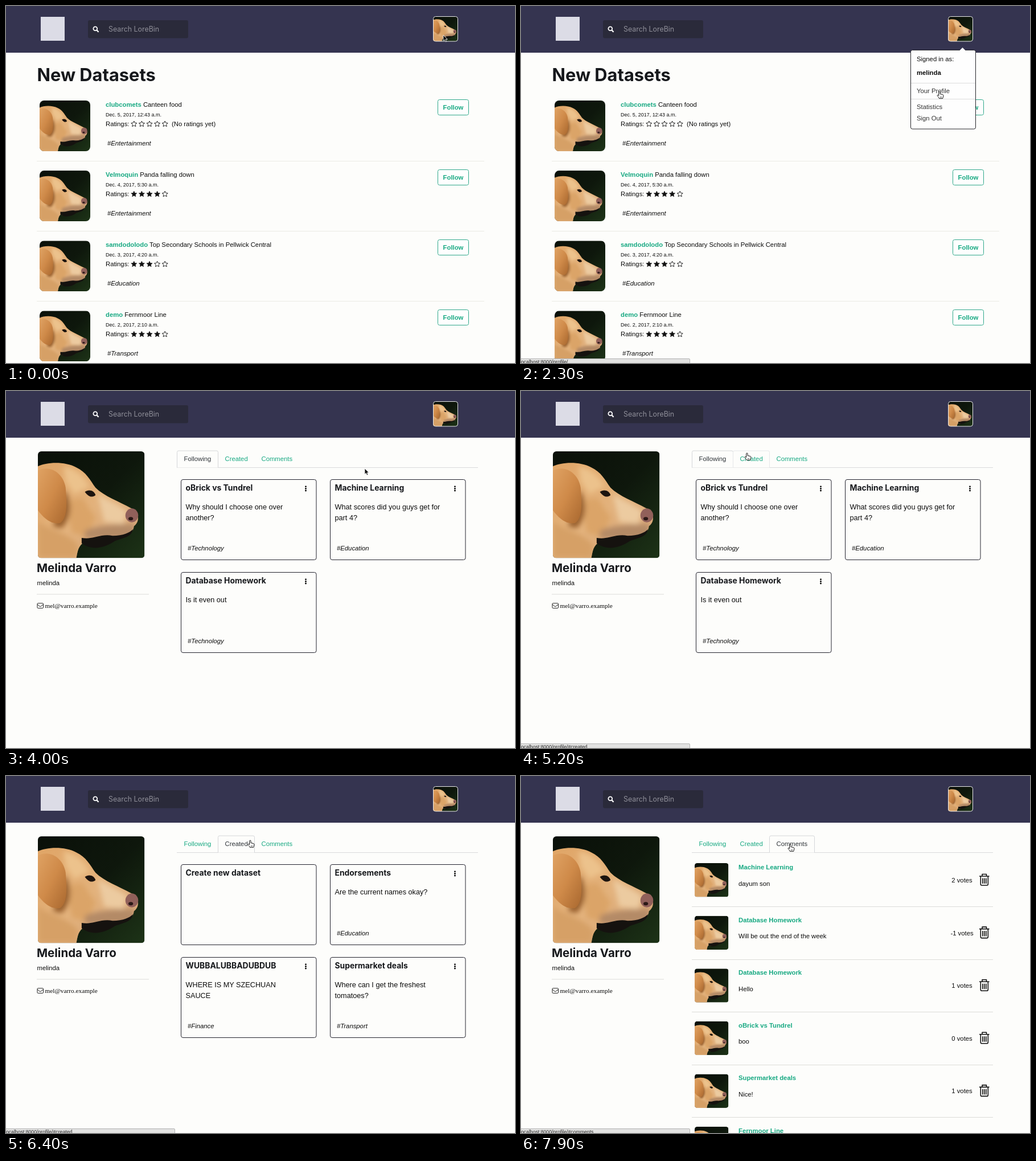
An HTML page for the animation above (8 s loop, 894 by 627 pixels).

```html
<!DOCTYPE html>
<html lang="en">
<head>
<meta charset="utf-8">
<title>Dataset site tour</title>
<style>
html, body { margin: 0; width: 100%; height: 100%; overflow: hidden; background: #fdfdfb; }
svg { display: block; width: 894px; height: 627px; }
text { font: 11.3px "Liberation Sans", Arial, sans-serif; fill: #0c0c0c; white-space: pre; }
.b { font-weight: 700; }
.i { font-style: italic; }
.bold-link { fill: #17a982; font-weight: 700; }
.small { font-size: 8.95px; }
.body { font-size: 12.7px; }
.menu { fill: #333; }
.mid { text-anchor: middle; }
.head { font: 700 13.9px Inter, sans-serif; fill: #16181c; }
.title { font: 700 30.8px Inter, sans-serif; fill: #16181c; }
.name { font: 700 20.5px Inter, sans-serif; fill: #16181c; }
.search { font: 12.4px Inter, sans-serif; fill: #8f8f99; }
.serif { font-family: "Liberation Serif", Times, serif; }
.status { font-size: 8.7px; fill: #222; }
</style>
</head>
<body>
<svg id="stage" viewBox="0 0 894 627" xmlns="http://www.w3.org/2000/svg"></svg>
<script>
const LOOP = 8000, STEP = 100;
const MENU_OPEN = 400, MENU_CLICK = 2700, PAGE_LOAD = 3400, TAB_CLICKS = [5800, 7500];

// time, x, y of the pointer tip
const PATH = [
  [0, 768, 51], [900, 768, 51], [1600, 745, 108], [2200, 735, 150], [3300, 735, 150],
  [4000, 630, 136], [5000, 399, 109], [5200, 397, 109], [5700, 405, 114],
  [6100, 405, 114], [6400, 429, 113], [7000, 473, 120], [8000, 473, 120]
];

const TABS = [['Following', 301, 373], ['Created', 373, 437], ['Comments', 437, 516]];

const DATASETS = [
  ['clubcomets', 'Canteen food', 'Dec. 5, 2017, 12:43 a.m.', 0, 'Entertainment'],
  ['Velmoquin', 'Panda falling down', 'Dec. 4, 2017, 5:30 a.m.', 4, 'Entertainment'],
  ['samdodolodo', 'Top Secondary Schools in Pellwick Central', 'Dec. 3, 2017, 4:20 a.m.', 3, 'Education'],
  ['demo', 'Fernmoor Line', 'Dec. 2, 2017, 2:10 a.m.', 4, 'Transport']
];
const FOLLOWING = [
  ['oBrick vs Tundrel', ['Why should I choose one over', 'another?'], 'Technology'],
  ['Machine Learning', ['What scores did you guys get for', 'part 4?'], 'Education'],
  ['Database Homework', ['Is it even out'], 'Technology']
];
const CREATED = [
  ['Create new dataset', [], ''],
  ['Endorsements', ['Are the current names okay?'], 'Education'],
  ['WUBBALUBBADUBDUB', ['WHERE IS MY SZECHUAN', 'SAUCE'], 'Finance'],
  ['Supermarket deals', ['Where can I get the freshest', 'tomatoes?'], 'Transport']
];
const COMMENTS = [
  ['Machine Learning', 'dayum son', 2],
  ['Database Homework', 'Will be out the end of the week', -1],
  ['Database Homework', 'Hello', 1],
  ['oBrick vs Tundrel', 'boo', 0],
  ['Supermarket deals', 'Nice!', 1],
  ['Fernmoor Line', '', 0]
];

const text = (x, y, s, cls = '') => `<text x="${x}" y="${y}" class="${cls}">${s}</text>`;
const rect = (x, y, w, h, r, fill, stroke = 'none') =>
  `<rect x="${x}" y="${y}" width="${w}" height="${h}" rx="${r}" fill="${fill}" stroke="${stroke}"/>`;
const rule = (x1, x2, y, color) => `<path d="M${x1} ${y}H${x2}" stroke="${color}"/>`;
const path = (d, fill, stroke = 'none', w = 1) =>
  `<path d="${d}" fill="${fill}" stroke="${stroke}" stroke-width="${w}" stroke-linejoin="round"/>`;
const group = (id, body) => `<g id="${id}">${body}</g>`;

let clips = 0;
function photo(x, y, size, r) {
  const id = 'clip' + clips++;
  return `<clipPath id="${id}">${rect(x, y, size, size, r, '#000')}</clipPath>` +
    `<g clip-path="url(#${id})"><use href="#dog" x="${x}" y="${y}" width="${size}" height="${size}"/></g>`;
}

const gradient = (id, ...colors) => `<linearGradient id="${id}" x1="0" y1="0" x2="1" y2="1">` +
  colors.map((c, k) => `<stop offset="${k / (colors.length - 1)}" stop-color="${c}"/>`).join('') + '</linearGradient>';

const HEAD = 'M0 14C8 10 25 9 36 15C45 19 49 27 54 34C62 42 76 47 87 53C95 56 96 66 90 70C89 80 78 79 68 80L58 87C50 90 45 89 42 86C37 90 37 96 36 100H0Z';
const dog = `<symbol id="dog" viewBox="0 0 100 100">
  ${gradient('dark', '#0a1009', '#0e170c', '#1d3317')}
  ${gradient('fur', '#e0a566', '#e3b27c', '#d3a378')}
  ${gradient('ear', '#dfa263', '#cf8a49', '#a9682f')}
  <filter id="soft"><feGaussianBlur stdDeviation="2.5"/></filter>
  <clipPath id="skull">${path(HEAD, '#000')}</clipPath>
  <rect width="100" height="100" fill="url(#dark)"/>
  ${path(HEAD, 'url(#fur)')}
  <g clip-path="url(#skull)"><g filter="url(#soft)">
    ${path('M0 66C12 74 28 76 38 88L36 100H0Z', '#d6a066')}
    ${path('M24 14C36 16 44 24 48 33L34 40L26 28Z', '#ecc28c')}
    ${path('M56 40C66 46 76 50 84 56L80 68L62 66Z', '#eccba0')}
    ${path('M26 46L42 44L54 62L46 80L32 76Z', '#dba468')}
    ${path('M44 74C56 70 70 68 90 68V82H44Z', '#b48a66')}
    ${path('M26 36C32 50 32 62 22 72L14 70Z', '#99602f')}
  </g></g>
  ${path('M0 18C12 12 24 21 26 34C27 48 28 62 21 67C12 69 4 61 0 55Z', 'url(#ear)')}
  ${path('M41 81C52 83 58 77 70 79C80 79 86 76 89 73C88 80 80 81 72 84C62 91 50 93 41 86Z', '#15120f')}
  ${path('M44 38C48 35 53 37 54 41C50 44 47 42 44 38Z', '#1d140f')}
  <ellipse cx="88" cy="60" rx="6" ry="6.5" fill="#91605a"/><ellipse cx="87" cy="63" rx="2.2" ry="1.6" fill="#2b1816"/>
</symbol>`;

function star(cx, cy, full) {
  const pts = Array.from({ length: 10 }, (_, k) => {
    const a = k * Math.PI / 5, r = k % 2 ? 2.5 : 5.3;
    return (cx + r * Math.sin(a)).toFixed(2) + ' ' + (cy - r * Math.cos(a)).toFixed(2);
  });
  return path('M' + pts.join('L') + 'Z', full ? '#111' : 'none', '#111', full ? .6 : .9);
}

function dataset([user, title, date, stars, tag], k) {
  const y = 123.1 * k;
  return photo(59, 166 + y, 89, 8) +
    text(175, 177 + y, `<tspan class="bold-link">${user}</tspan> ${title}`) +
    text(175, 194 + y, date, 'small') + text(175, 211 + y, 'Ratings:') +
    [0, 1, 2, 3, 4].map(n => star(224.8 + 13.6 * n, 207.3 + y, n < stars)).join('') +
    (stars ? '' : text(291, 211 + y, '(No ratings yet)')) +
    text(178, 245 + y, '#' + tag, 'i') +
    rect(758.5, Math.round(164 + y) + .5, 54, 27, 3, '#fefefe', '#2fa88b') +
    text(785.5, 182 + y, 'Follow', 'bold-link mid') +
    rule(54, 840, Math.round(272 + y) + .5, '#ebebe4');
}

function card([title, lines, tag], k) {
  const x = 308 + 262 * (k % 2), y = 156 + 163 * (k >> 1);
  const dots = [0, 1, 2].map(n => `<circle cx="${x + 218.5}" cy="${y + 11.8 + 3.6 * n}" r="1.4"/>`).join('');
  return rect(x - .5, y - .5, 237.5, 141, 3.5, '#fdfdfb', '#24242f') +
    text(x + 7.5, y + 19, title, 'head') +
    lines.map((s, n) => text(x + 7.5, y + 52 + 19 * n, s, 'body')).join('') +
    (tag ? dots + text(x + 11, y + 123.5, '#' + tag, 'i') : '');
}

function comment([title, body, votes], k) {
  const y = 92.6 * k;
  const trash = `M805 ${176 + y}h17.5M810 ${175.5 + y}v-3h7.5v3M807.3 ${176.5 + y}v13.5q0 2 2 2h9q2 0 2-2v-13.5` +
    `M810.8 ${179.5 + y}v9.5M813.8 ${179.5 + y}v9.5M816.8 ${179.5 + y}v9.5`;
  return photo(305, 153 + y, 59.5, 4.5) + text(382, 164 + y, title, 'bold-link') +
    text(382, 192.5 + y, body) + text(774.5, 187 + y, votes + ' votes', 'mid') +
    path(trash, 'none', '#111', 1.6) + rule(300, 829, Math.round(229 + y) + .5, '#dcdcd9');
}

const tab = ([label, x1, x2], k) =>
  `<path id="edge${k}" fill="#fdfdfb" d="M${x1 - .5} 134.5V107.5q0-2.5 2.5-2.5H${x2 - 3}q2.5 0 2.5 2.5V134.5"/>` +
  `<text id="tab${k}" x="${x1 + 11.5}" y="123">${label}</text>`;

const header = rect(0, 0, 894, 82, 0, '#353450') +
  rect(61, 19, 42, 42, 0, '#dcdce6') +
  rect(144, 25, 176, 31.5, 3, '#2a2a3a') +
  '<circle cx="156.8" cy="39.8" r="3.4" fill="none" stroke="#fff" stroke-width="1.8"/>' +
  path('M159.3 42.3l3.3 3.4', 'none', '#fff', 2.2) +
  text(180, 45, 'Search LoreBin', 'search') +
  photo(750, 18.5, 43.5, 4) + rect(750.5, 18.5, 43, 43.5, 4, 'none', '#e8e8e8');

const home = text(54.5, 132, 'New Datasets', 'title') + DATASETS.map(dataset).join('');

const menu = rect(684.5, 77.5, 114, 138.5, 3, '#fefefe', '#26262c') +
  path('M770 78.5L775.5 73L781 78.5Z', '#fefefe') +
  text(695, 97, 'Signed in as:') + text(695, 121, 'melinda', 'b') + rule(685, 798, 135.5, '#dcdcdc') +
  text(695, 153, 'Your Profile', 'menu') + rule(685, 798, 163.5, '#dcdcdc') +
  text(695, 180.5, 'Statistics', 'menu') + text(695, 200.5, 'Sign Out', 'menu');

const profile = photo(56, 106, 187.5, 6) +
  text(54, 318, 'Melinda Varro', 'name') + text(54.5, 340.5, 'melinda') + rule(54, 251, 357, '#dcdcd9') +
  rect(55, 372.8, 10.5, 8.6, 1.2, 'none', '#222') + path('M55 375l5.2 3.8 5.3-3.8', 'none', '#222') +
  text(68.5, 381, 'mel@varro.example', 'serif') +
  rule(300, 829, 134.5, '#d9dadb') + TABS.map(tab).join('') +
  group('panel0', FOLLOWING.map(card).join('')) +
  group('panel1', CREATED.map(card).join('')) +
  group('panel2', COMMENTS.map(comment).join(''));

const status = rect(-2, 619.5, 298.5, 12, 1.5, '#e2e2e1', '#b4b4b4') +
  '<text id="url" y="628.3" class="status"></text>';

const arrow = path('M0 0V10.3L2.4 8.2L4 11.9L5.9 11.1L4.3 7.5H7.4Z', '#111', '#fff', .8);
const hand = path('M-1.3 1.2c0-1.6 2.4-1.6 2.4 0v3.3l4 .9c1.5.3 2 1 1.8 2.4l-.6 2.5-.6 2H-.6c-.8-2.2-2.4-3.2-3.2-4.8-.4-1 .8-1.7 1.6-.9l.9 1z', '#fff', '#111', 1) +
  path('M1.6 9v2M3.4 9v2', 'none', '#111', .7);

document.getElementById('stage').innerHTML = dog + rect(0, 0, 894, 627, 0, '#fdfdfb') + header +
  group('home', home) + group('menu', menu) + group('profile', profile) + group('status', status) +
  group('cursor', group('arrow', arrow) + group('hand', hand));

const el = id => document.getElementById(id);
const show = (id, on) => { el(id).style.display = on ? '' : 'none'; };

function pointer(t) {
  const k = PATH.findIndex((p, n) => n && t < p[0]);
  const [t0, x0, y0] = PATH[k - 1], [t1, x1, y1] = PATH[k];
  const u = (t - t0) / (t1 - t0), e = u * u * (3 - 2 * u);
  return [x0 + (x1 - x0) * e, y0 + (y1 - y0) * e];
}

function draw(time) {
  const t = Math.floor(time % LOOP / STEP) * STEP;
  const [x, y] = pointer(t);
  const loaded = t >= PAGE_LOAD, menuOpen = t >= MENU_OPEN && t < MENU_CLICK;
  const active = TAB_CLICKS.filter(c => t >= c).length;
  const hover = loaded && y > 104 && y < 134 ? TABS.findIndex(([, a, b]) => x >= a && x < b) : -1;
  const onItem = menuOpen && y > 139 && y < 161;

  let url = '';
  if (onItem) url = 'localhost:8000/profile/';
  else if (t >= MENU_CLICK && !loaded) url = 'Waiting for localhost...';
  else if (hover >= 0) url = 'localhost:8000/profile/#' + TABS[hover][0].toLowerCase();

  show('home', !loaded);
  show('profile', loaded);
  show('menu', menuOpen);
  show('status', url);
  el('url').textContent = url;
  el('url').setAttribute('x', url[0] === 'W' ? 0 : -2);

  TABS.forEach((_, k) => {
    show('panel' + k, k === active);
    show('edge' + k, k === active || k === hover);
    el('edge' + k).setAttribute('stroke', k === active ? '#d5d7d9' : '#e6e8ea');
    el('tab' + k).style.fill = k === active ? '#2e3338' : '#17a982';
  });

  const pointing = onItem || hover >= 0;
  show('hand', pointing);
  show('arrow', !pointing);
  el('cursor').setAttribute('transform', `translate(${x.toFixed(1)} ${y.toFixed(1)})`);
}

const start = performance.now();
function tick() {
  draw(performance.now() - start);
  requestAnimationFrame(tick);
}
tick();
</script>
</body>
</html>
```
